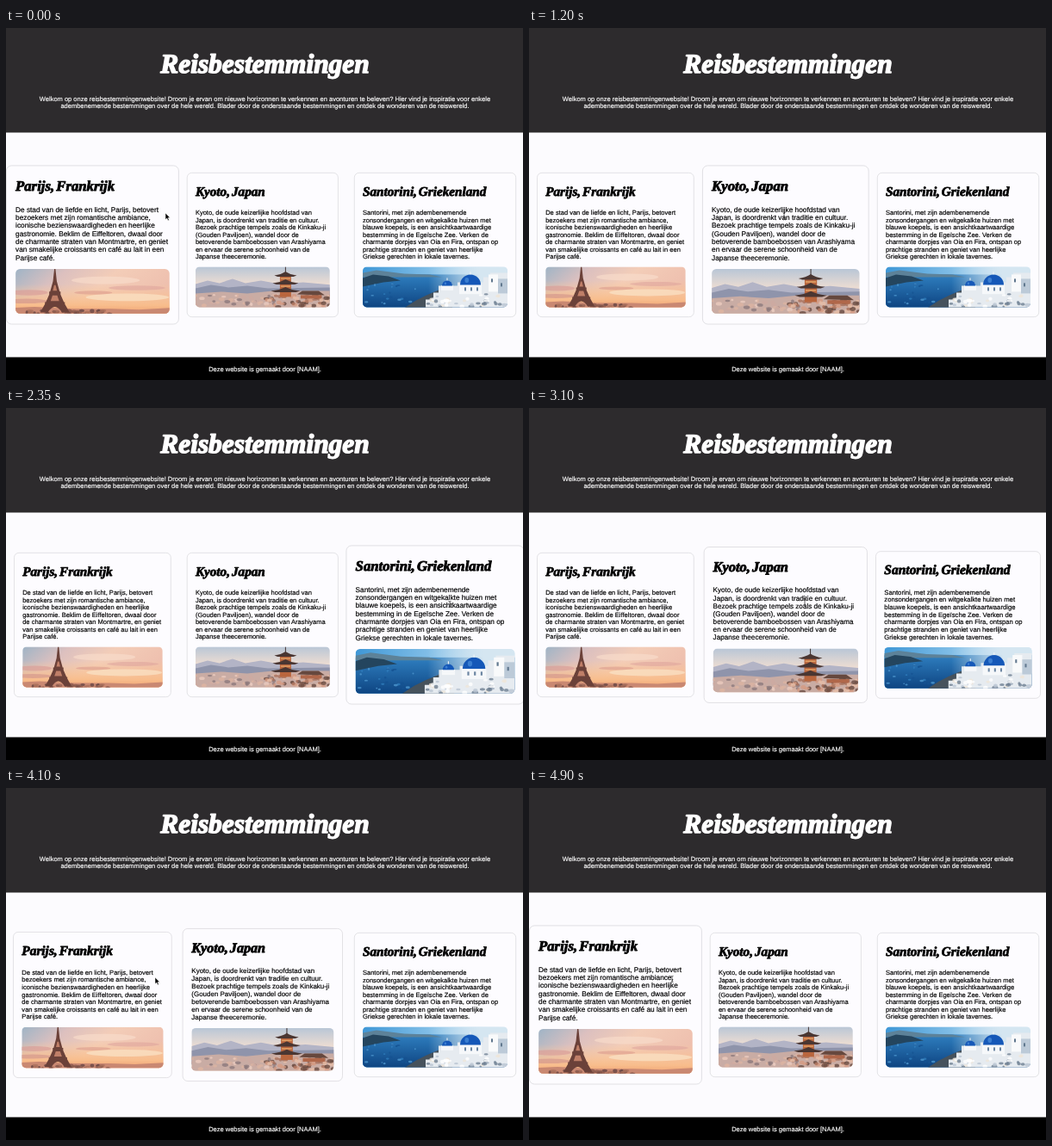
Recreate the animation shown at these times as an HTML page. Size 600 by 409 pixels, loop 4950 ms.

```html
<!DOCTYPE html>
<html lang="nl">
<head>
<meta charset="utf-8">
<title>Reisbestemmingen</title>
<style>
  @property --zoom { syntax: "<number>"; inherits: false; initial-value: 1; }
  html, body { margin: 0; width: 100%; height: 100%; overflow: hidden; background: #fcfbfe; }
  svg { display: block; width: 600px; height: 409px; }
  text { font: 7.52px "Liberation Sans", Arial, sans-serif; text-rendering: geometricPrecision; stroke: #000; stroke-width: .16; }
  .mid { text-anchor: middle; fill: #fff; stroke: #fff; }
  .title { font: italic bold 15.2px "Liberation Serif", "Times New Roman", serif; word-spacing: -.12em; stroke-width: .75; stroke-linejoin: round; }
  .mid.title { font-size: 31.4px; stroke-width: 1.5; }

  .card, #pointer, #arrow, #beam { animation: 4950ms infinite; }
  .card { animation-timing-function: ease; transform: scale(var(--zoom)); }
  #paris { animation-name: paris; transform-origin: 100.4px 252px; }
  #kyoto { animation-name: kyoto; transform-origin: 297.8px 252px; }
  #santorini { animation-name: santorini; transform-origin: 498px 252px; }
  @keyframes paris {
    0%, 15.56% { --zoom: 1.1; }
    21.62%, 82.2% { --zoom: 1; }
    88.26%, 100% { --zoom: 1.1; }
  }
  @keyframes kyoto {
    0%, 15.96% { --zoom: 1; }
    22.02%, 37.37% { --zoom: 1.1; }
    43.43%, 59.6% { --zoom: 1; }
    65.66%, 81.31% { --zoom: 1.1; }
    87.37%, 100% { --zoom: 1; }
  }
  @keyframes santorini {
    0%, 37.58% { --zoom: 1; }
    43.64%, 59.6% { --zoom: 1.1; }
    65.66%, 100% { --zoom: 1; }
  }

  #pointer { animation-name: move; animation-timing-function: linear; }
  @keyframes move {
    0%, 11% { transform: translate(185px, 215px); }
    14% { transform: translate(189px, 215px); }
    15.7% { transform: translate(201px, 216px); }
    17.2% { transform: translate(258px, 217px); }
    19.2% { transform: translate(291px, 218px); }
    24.24% { transform: translate(296px, 218px); }
    33.3% { transform: translate(300px, 219px); }
    36% { transform: translate(345px, 220px); }
    37.4% { transform: translate(396px, 221px); }
    39.39% { transform: translate(516px, 223px); }
    47.47%, 55.6% { transform: translate(515px, 228px); }
    58.2% { transform: translate(460px, 227px); }
    59.6% { transform: translate(394px, 226px); }
    62.63% { transform: translate(320px, 225px); }
    76.8% { transform: translate(314px, 224px); }
    79.8% { transform: translate(270px, 222px); }
    81.4% { transform: translate(201px, 221px); }
    82.83% { transform: translate(173px, 220px); }
    88.9% { transform: translate(168px, 221px); }
    99%, 100% { transform: translate(166px, 222px); }
  }
  #arrow, #beam { animation-timing-function: step-end; }
  #arrow { animation-name: arrow; }
  #beam { animation-name: beam; }
  @keyframes arrow {
    0%, 37.3%, 59.2%, 80.4%, 100% { opacity: 1; }
    17.2%, 38.8%, 60.6%, 83.9% { opacity: 0; }
  }
  @keyframes beam {
    0%, 37.3%, 59.2%, 80.4%, 100% { opacity: 0; }
    17.2%, 38.8%, 60.6%, 83.9% { opacity: 1; }
  }
</style>
</head>
<body>
<svg viewBox="0 0 600 409">
  <defs>
    <linearGradient id="dusk" x2="1" y2=".35">
      <stop stop-color="#9fb4c6"/><stop offset=".3" stop-color="#dcc0bf"/>
      <stop offset=".6" stop-color="#f3cdb8"/><stop offset="1" stop-color="#eebfae"/>
    </linearGradient>
    <linearGradient id="glow" x2="0" y2="1">
      <stop stop-color="#fbc898" stop-opacity="0"/><stop offset=".7" stop-color="#f8bd8c"/><stop offset="1" stop-color="#ee9f70"/>
    </linearGradient>
    <linearGradient id="haze" x2="0" y2="1">
      <stop stop-color="#b9c6d6"/><stop offset=".45" stop-color="#f0ded2"/><stop offset="1" stop-color="#ecccb8"/>
    </linearGradient>
    <linearGradient id="sky" x2="1" y2="0">
      <stop stop-color="#3f97d6"/><stop offset=".55" stop-color="#8fc6ea"/><stop offset="1" stop-color="#dcebf4"/>
    </linearGradient>
    <linearGradient id="sea" x2="0" y2="1">
      <stop stop-color="#2f7fc0"/><stop offset="1" stop-color="#0d4380"/>
    </linearGradient>
    <linearGradient id="light">
      <stop offset=".45" stop-color="#d5e6f1" stop-opacity="0"/><stop offset=".8" stop-color="#d5e6f1"/>
    </linearGradient>
  </defs>

  <rect width="600" height="409" fill="#fcfbfe"/>
  <rect width="600" height="121.5" fill="#2d2b2d"/>
  <text class="mid title" x="300.5" y="52">Reisbestemmingen</text>
  <text class="mid" x="300.5" y="84.7">Welkom op onze reisbestemmingenwebsite! Droom je ervan om nieuwe horizonnen te verkennen en avonturen te beleven? Hier vind je inspiratie voor enkele</text>
  <text class="mid" x="300.5" y="93.2">adembenemende bestemmingen over de hele wereld. Blader door de onderstaande bestemmingen en ontdek de wonderen van de reiswereld.</text>
  <rect y="382.5" width="600" height="27" fill="#000"/>
  <text class="mid" x="300.5" y="398.8">Deze website is gemaakt door [NAAM].</text>

  <g id="cards"></g>

  <g id="pointer">
    <path id="arrow" d="M0 0V7.6L1.8 6 3 8.8 4.3 8.2 3.1 5.5H5.4Z" fill="#000" stroke="#fff" stroke-width=".5"/>
    <path id="beam" d="M-1.5-3.6Q0-3.6 0-2.6V2.6Q0 3.6-1.5 3.6M1.5-3.6Q0-3.6 0-2.6M0 2.6Q0 3.6 1.5 3.6" fill="none" stroke="#222" stroke-width=".7"/>
  </g>
</svg>
<script>
  let seed = 7;
  const rnd = () => (seed = seed * 16807 % 2147483647) / 2147483647;
  const shape = (fill, d) => `<path fill="${fill}" d="${d}"/>`;
  const box = (fill, x, y, w, h) => `<rect fill="${fill}" x="${x}" y="${y}" width="${w}" height="${h}"/>`;
  const blob = (fill, x, y, rx, ry, o = 1) =>
    `<ellipse fill="${fill}" opacity="${o}" cx="${x}" cy="${y}" rx="${rx}" ry="${ry}"/>`;

  // Scatter soft specks over a rectangle
  const specks = (n, colors, x, y, w, h, r) => Array.from({ length: n }, () =>
    blob(colors[Math.floor(rnd() * colors.length)], x + rnd() * w, y + rnd() * h,
      r * (.6 + rnd()), r * (.5 + rnd() * .5), .8)).join('');

  const paris = () =>
    box('url(#dusk)', 0, 0, 164, 48) +
    box('url(#glow)', 0, 16, 164, 32) +
    blob('#f8dccb', 95, 12, 36, 4, .7) + blob('#dc9f9b', 128, 20, 30, 2.5, .5) +
    blob('#fbe0c2', 118, 30, 44, 4, .8) + blob('#d99a97', 14, 25, 20, 3, .6) +
    blob('#d8948a', 82, 25, 20, 2, .5) + blob('#c9898a', 12, 34, 22, 2.5, .5) +
    shape('#c98872', 'M0 41L20 40 60 42 100 42 130 43 164 41V48H0Z') +
    specks(40, ['#8b5a4e', '#a9705c', '#6a4644'], 0, 44, 100, 4, 2.2) +
    shape('#6b4139', 'M40.9 0H42.1L43.5 13 46.5 24H47.5V27L51 35H52V37L57 46H49Q41.5 34 34 46H26L31 37V35H32L35.5 27V24H36.5L39.5 13Z') +
    shape('#c07f68', 'M40.8 17H42.2L43.7 23H39.3ZM39 28H44L46 34H37Z');

  const kyoto = () => {
    const roof = (y, w) => shape('#4a3632', `M${104.5 - w} ${y + 3}Q${104.5 - w * .4} ${y + 2} 104.5 ${y - 1.5}Q${104.5 + w * .4} ${y + 2} ${104.5 + w} ${y + 3}L${104.5 + w * .7} ${y + 4.5}H${104.5 - w * .7}Z`);
    return box('url(#haze)', 0, 0, 157, 48) +
      shape('#b3b4c6', 'M0 20L14 16 28 19 43 14 58 19 76 16 98 20 125 18 157 21V40H0Z') +
      shape('#8f94ab', 'M0 25L18 21 38 24 60 22 84 25 157 24V40H0Z') +
      shape('#c9aca4', 'M0 31L30 29 60 31 90 28 157 28V48H0Z') +
      specks(50, ['#cdaaa2', '#ecccc0', '#8d7a7c', '#dcb4a2'], 0, 32, 95, 14, 2.2) +
      specks(70, ['#a8705a', '#d69c82', '#6a4c42', '#e8bfa8'], 82, 33, 75, 14, 2.4) +
      box('#443838', 104, 0, 1, 8) +
      box('#b9663e', 98, 10, 13, 25) +
      roof(7, 13) + roof(16, 15) + roof(25, 17) +
      box('#e2a266', 99, 13, 11, 1.4) + box('#e2a266', 99, 22, 11, 1.4) +
      shape('#66483e', 'M118 32L124 28H143L150 33Z') + box('#b0674a', 122, 33, 24, 4);
  };

  const santorini = () => {
    const dome = (x, y, r) =>
      box('#f6f8fa', x - r - 1, y, 2 * r + 2, r * .9) +
      shape('#1558b8', `M${x - r} ${y}A${r} ${r} 0 0 1 ${x + r} ${y}Z`) +
      blob('#4a8fdc', x - r * .35, y - r * .45, r * .2, r * .25, .7) +
      box('#f4f6f8', x - .5, y - r - 3, 1, 3);
    return box('url(#sky)', 0, 0, 169, 48) +
      box('url(#sea)', 0, 9, 169, 39) +
      box('url(#light)', 0, 0, 169, 30) +
      shape('#5d8299', 'M0 7L16 4 32 6 48 8 78 9 92 12H0Z') +
      shape('#24455e', 'M0 13L12 9 30 11 44 16 24 18 0 23Z') +
      specks(24, ['#2f7cbc', '#145291', '#4d97cf'], 2, 21, 60, 24, 1.5) +
      shape('#46525c', 'M48 48L62 39 74 33 88 27 104 23V48Z') +
      shape('#e6ebf0', 'M73 48V38H82V30H88V22H110V18H140V12H148V7H169V48Z') +
      specks(44, ['#fff', '#b9c5d3', '#efe6da', '#6f8093'], 76, 32, 92, 15, 2.2) +
      box('#f9fafb', 146, 9, 11, 20) + box('#bccad8', 157, 14, 11, 17) +
      box('#61788f', 149, 14, 2, 4) + box('#61788f', 160, 19, 2, 4) +
      dome(98, 22, 6) + dome(125, 21, 12) +
      box('#6c86a2', 118, 24, 2, 4) + box('#6c86a2', 125, 24, 2, 4) + box('#6c86a2', 132, 24, 2, 4);
  };

  const cards = [
    { id: 'paris', x: 9.5, w: 181.8, title: 'Parijs, Frankrijk', photo: paris, text:
`De stad van de liefde en licht, Parijs, betovert
bezoekers met zijn romantische ambiance,
iconische bezienswaardigheden en heerlijke
gastronomie. Beklim de Eiffeltoren, dwaal door
de charmante straten van Montmartre, en geniet
van smakelijke croissants en café au lait in een
Parijse café.` },
    { id: 'kyoto', x: 210.2, w: 175.2, title: 'Kyoto, Japan', photo: kyoto, text:
`Kyoto, de oude keizerlijke hoofdstad van
Japan, is doordrenkt van traditie en cultuur.
Bezoek prachtige tempels zoals de Kinkaku-ji
(Gouden Paviljoen), wandel door de
betoverende bamboebossen van Arashiyama
en ervaar de serene schoonheid van de
Japanse theeceremonie.` },
    { id: 'santorini', x: 404.3, w: 187.4, title: 'Santorini, Griekenland', photo: santorini, text:
`Santorini, met zijn adembenemende
zonsondergangen en witgekalkte huizen met
blauwe koepels, is een ansichtkaartwaardige
bestemming in de Egeïsche Zee. Verken de
charmante dorpjes van Oia en Fira, ontspan op
prachtige stranden en geniet van heerlijke
Griekse gerechten in lokale tavernes.` }
  ];

  document.getElementById('cards').innerHTML = cards.map(({ id, x, w, title, photo, text }) => {
    const left = x + 9.7;
    const lines = text.split('\n').map((line, i) =>
      `<text x="${left}" y="${217.2 + i * 8.5}">${line}</text>`).join('');
    return `<g class="card" id="${id}">
      <rect x="${x}" y="168.3" width="${w}" height="167.4" rx="5.5" fill="#fdfcff" stroke="#d9d8dc" stroke-width=".7"/>
      <text class="title" x="${left}" y="194.6">${title}</text>${lines}
      <clipPath id="${id}-clip"><rect width="${w - 19.4}" height="47" rx="4.7"/></clipPath>
      <g transform="translate(${left} 277.4)" clip-path="url(#${id}-clip)">${photo()}</g>
    </g>`;
  }).join('');
</script>
</body>
</html>
```
